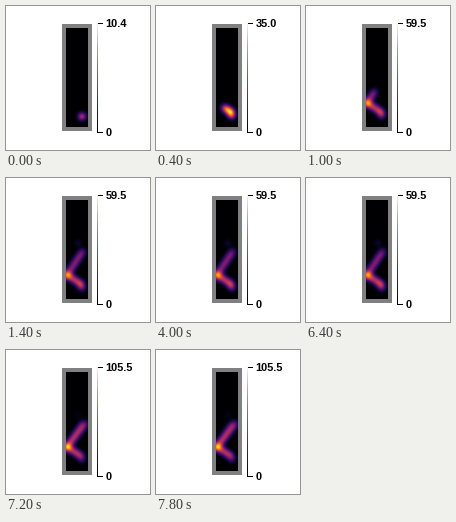
Write a matplotlib script that moves like this. It is 144x144 px and loops after 8000 ms.

```python
import math

import numpy as np
import matplotlib.pyplot as plt
from matplotlib.animation import FuncAnimation
from matplotlib.patches import Rectangle

SIZE, DPI, STEP, FRAMES = 144, 72, 200, 40
LEFT, RIGHT, TOP, BOTTOM = 60, 82, 22, 121
SPREAD = 2.9

CORNER, BEND, FORK, TIP = (76, 110.5), (75, 106), (61, 97), (77, 73)
FAINT, EDGE = (72, 65), (80, 73)

# Departure step, arrival step, from, to, peak heat left along the way
LEGS = [
    (0, 1, CORNER, BEND, 22),
    (1, 3, BEND, FORK, 30),
    (4, 4, FORK, FORK, 18),
    (4, 6, FORK, TIP, 21),
    (7, 7, FAINT, FAINT, 4),
    (32, 33, EDGE, FORK, 7),
    (34, 34, EDGE, FORK, 12),
    (34, 34, FORK, BEND, 8),
    (35, 36, EDGE, FORK, 11),
    (35, 36, FORK, BEND, 13),
    (36, 36, FORK, FORK, 16),
]

grid_x, grid_y = np.meshgrid(np.arange(LEFT, RIGHT) + 0.5, np.arange(TOP, BOTTOM) + 0.5)


def heat_at(step):
    """Sum of soft spots dropped about one pixel apart along every leg."""
    heat = np.zeros_like(grid_x)
    for depart, arrive, start, end, peak in LEGS:
        count = max(1, round(math.dist(start, end)))
        strength = peak / min(count, SPREAD * math.sqrt(2 * math.pi))
        times = np.linspace(depart, arrive, count)
        points = np.linspace(start, end, count)
        for x, y in points[times <= step]:
            distance = (grid_x - x) ** 2 + (grid_y - y) ** 2
            heat += strength * np.exp(-distance / (2 * SPREAD ** 2))
    return heat


def scale_at(step):
    return np.interp(step, [0, 4, 33, 34, 36], [10.4, 59.5, 59.5, 83.7, 105.5])


def box(x, y, width, height, color):
    ax.add_patch(Rectangle((x, y), width, height, fc=color, lw=0, antialiased=False))


def heat_image(values, left, right, top, bottom):
    return ax.imshow(values, extent=(left, right, bottom, top), cmap="inferno", vmin=0,
                     vmax=1, interpolation="nearest", aspect="auto", zorder=2)


def label(y, text):
    return ax.text(99.5, y, text, family="Liberation Sans", weight="bold", size=11,
                   va="baseline")


fig = plt.figure(figsize=(SIZE / DPI, SIZE / DPI), dpi=DPI, facecolor="white")
ax = fig.add_axes([0, 0, 1, 1])
ax.axis("off")

box(56, 18, 30, 107, "#808080")
image = heat_image(heat_at(0), LEFT, RIGHT, TOP, BOTTOM)
heat_image(np.linspace(1, 0, 110)[:, None], 91, 92, 17, 127)
for tick_y in (17, 126):
    box(92, tick_y, 5, 1, "black")
top_label = label(21, "")
label(130, "0")
ax.set(xlim=(0, SIZE), ylim=(SIZE, 0))


def draw(step):
    scale = scale_at(step)
    image.set_data(heat_at(step) / scale)
    top_label.set_text(f"{scale:.1f}")
    return image, top_label


anim = FuncAnimation(fig, draw, frames=FRAMES, interval=STEP, repeat=True, repeat_delay=0)
plt.show()
```
